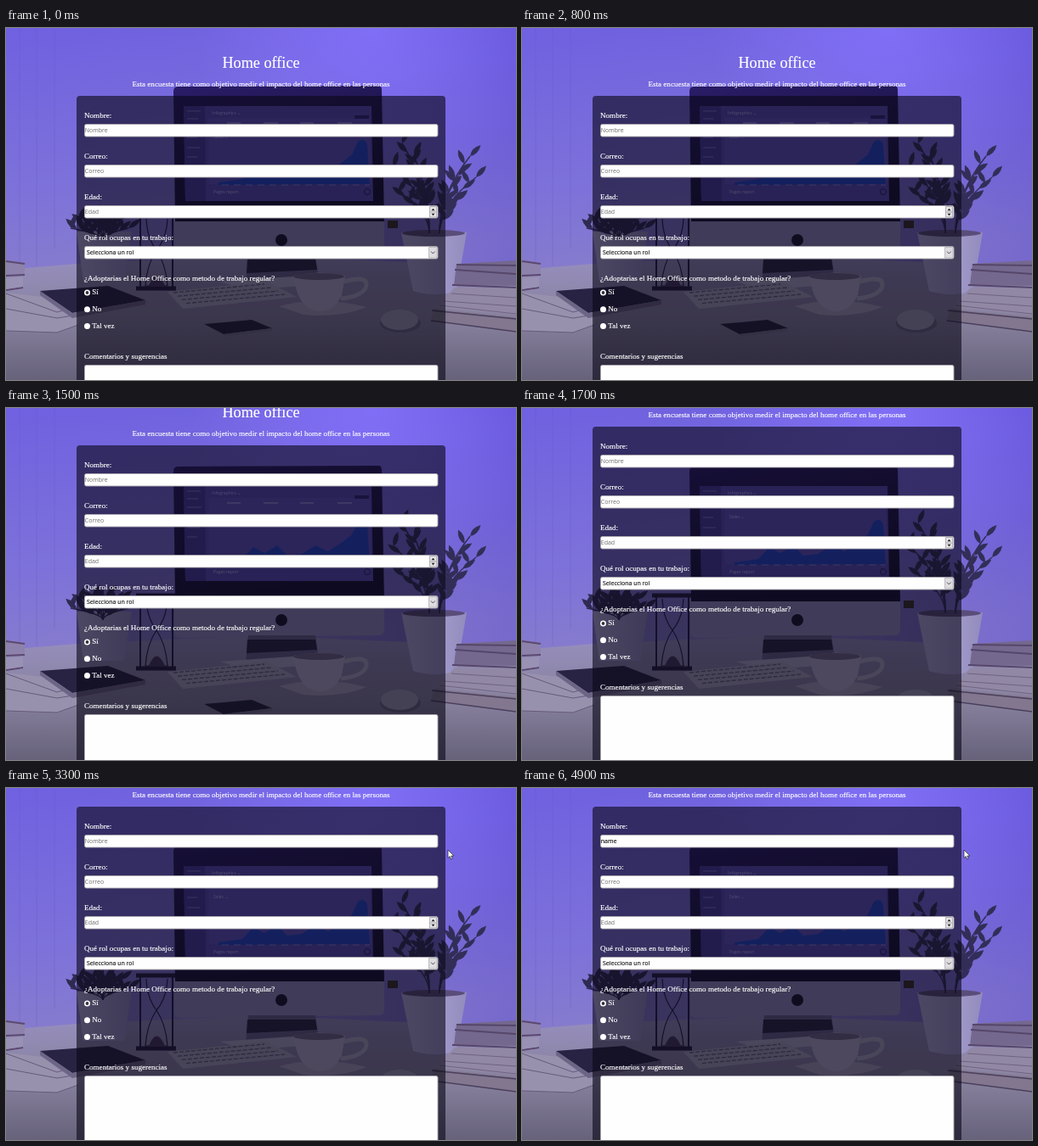
An HTML page for the animation above (5000 ms loop, 600 by 415 pixels).

```html
<!DOCTYPE html>
<html lang="es">
<head>
<meta charset="utf-8">
<title>Home office</title>
<style>
html, body { margin: 0; width: 100%; height: 100%; overflow: hidden; background: #7467d8; }
svg { display: block; width: 600px; height: 415px; }
#page text { font: 9.07px "Liberation Serif", serif; fill: #fff; stroke: #fff; stroke-width: .15; }
#page .title { font-size: 18.2px; }
#page .mid { text-anchor: middle; }
#page .val { font: 7px "Open Sans", sans-serif; fill: #111; stroke: #111; }
#page .hint { fill: #6c6c6c; stroke: none; }
</style>
</head>
<body>
<svg viewBox="0 0 600 415">
  <defs>
    <linearGradient id="wall" x2=".15" y2="1">
      <stop offset="0" stop-color="#6f61e0"/><stop offset=".45" stop-color="#7d71da"/>
      <stop offset=".72" stop-color="#877dcb"/>
    </linearGradient>
    <radialGradient id="glow" gradientUnits="userSpaceOnUse" cx="430" cy="0" r="210">
      <stop offset="0" stop-color="#8674ff" stop-opacity=".75"/><stop offset="1" stop-color="#8674ff" stop-opacity="0"/>
    </radialGradient>
    <linearGradient id="shade">
      <stop offset=".55" stop-color="#3a20d0" stop-opacity="0"/>
      <stop offset="1" stop-color="#3a20d0" stop-opacity=".22"/>
    </linearGradient>
    <linearGradient id="desk" x2="0" y2="1">
      <stop offset="0" stop-color="#978fbf"/><stop offset=".5" stop-color="#88829f"/>
      <stop offset="1" stop-color="#67627a"/>
    </linearGradient>
    <linearGradient id="pot"><stop offset="0" stop-color="#b6b0dc"/><stop offset="1" stop-color="#928bbd"/></linearGradient>
    <linearGradient id="bezel" x2=".3" y2="1"><stop offset="0" stop-color="#2a1c68"/><stop offset="1" stop-color="#141030"/></linearGradient>
  </defs>

  <g id="room">
    <rect width="600" height="415" fill="url(#wall)"/>
    <rect width="600" height="280" fill="url(#shade)"/>
    <rect width="600" height="210" fill="url(#glow)"/>
    <path d="M16 0V280M36 0V280M57 0V260" stroke="#6658c4" opacity=".35"/>
    <path d="M0 285L83 278 300 268 600 282V415H0z" fill="url(#desk)"/>
    <!-- books and notebook on the left -->
    <path d="M0 274L22 277V291L0 293z" fill="#8d82ab"/>
    <path d="M0 275L22 278M0 292L22 291M0 309L20 306" stroke="#5b4870" stroke-width="2"/>
    <path d="M0 295L20 293V305L0 308z" fill="#9a92b4"/>
    <path d="M0 312L85 322V350L60 359 0 357z" fill="#9891ae"/>
    <path d="M0 313L60 335 85 328M0 331L60 342 85 338M0 357L60 359 85 350" fill="none" stroke="#665a7b"/>
    <path d="M40 310L120 304 164 321 78 336z" fill="#282343"/>
    <path d="M40 310L78 336 164 321V326L78 342 40 315z" fill="#6c6585"/>
    <!-- left pot and hourglass -->
    <path d="M83 240H148L139 298H91z" fill="url(#pot)"/>
    <g id="bush"></g>
    <g fill="none" stroke="#241c40" stroke-width="3">
      <path d="M153 221H200M153 307H200" stroke-width="5"/>
      <path d="M158 221V307M196 221V307" stroke-width="2"/>
      <path d="M165 225Q166 248 177 262Q166 278 164 304H190Q188 278 177 262Q189 248 190 225" stroke-width="1.2"/>
    </g>
    <path d="M168 304Q177 281 187 304z" fill="#47365d"/>
    <!-- computer -->
    <path d="M198 225H445V262Q445 268 438 268L205 271Q198 271 198 264z" fill="#968ec0"/>
    <path d="M285 268H364L368 297 282 301z" fill="#69638b"/>
    <path d="M284 273H364L366 285 283 289z" fill="#292341"/>
    <path d="M252 299L366 291 396 300 284 309z" fill="#b1abc9"/>
    <path d="M202 69L438 68Q442 68 442 73L445 228H199L197 75Q197 69 202 69z" fill="url(#bezel)"/>
    <path d="M209 92H430L432 204H211z" fill="#584eba"/>
    <path d="M209 92H234L235 204H211z" fill="#473da0"/>
    <path d="M238 106H428L430 184H239z" fill="#6156c4"/>
    <path d="M250 185V182L278 178 291 164 304 171 319 162 331 174 348 172 364 162 379 169 396 158 407 149 414 134Q421 129 425 137L428 184z" fill="#2548ce"/>
    <g stroke="#aaa1ec" stroke-width="1" opacity=".65">
      <path d="M213 98H229M213 107H226M213 117H230M213 129H225M213 141H228M213 152H225"/>
      <path d="M260 112H276M303 112H320M346 112H362M390 112H407" stroke-width="2"/>
      <path d="M254 185H428" stroke-dasharray="8 6"/>
    </g>
    <g font-family="Open Sans, sans-serif" font-size="5" fill="#c4beff">
      <text x="242" y="102">Infographics ⌄</text><text x="244" y="130">Sales ⌄</text><text x="244" y="195">Pages report</text>
    </g>
    <path d="M410 103H427V107H410z" fill="#302679"/>
    <circle cx="425" cy="193" r="3.5" fill="none" stroke="#29205e"/>
    <circle cx="324" cy="250" r="7" fill="#19152c"/>
    <!-- keyboard, cup, phone, mouse -->
    <path d="M190 311L307 299 342 317 208 331z" fill="#aaa5bf"/>
    <g id="keys" stroke="#625d7b" stroke-width="1.3" stroke-dasharray="5 2"></g>
    <path d="M321 328Q370 315 424 329Q394 342 350 338z" fill="#aaa4bd"/>
    <path d="M338 292Q369 285 399 292L395 315Q386 335 367 334Q343 331 338 292z" fill="#b8b1cd"/>
    <ellipse cx="368" cy="293" rx="30" ry="4" fill="#716986"/>
    <path d="M397 299Q426 291 424 304Q421 316 394 319" fill="none" stroke="#b0aac4" stroke-width="5"/>
    <path d="M233 349L289 344 313 354 256 361z" fill="#25213c"/>
    <path d="M256 361L313 354V357L256 364z" fill="#77718c"/>
    <ellipse cx="464" cy="348" rx="24" ry="11" fill="#6b6680"/>
    <ellipse cx="463" cy="344" rx="22" ry="12" fill="#a49eb8"/>
    <!-- right plant and books -->
    <path d="M449 227H461V236H449z" fill="#3a3028"/>
    <path d="M465 241H542L530 310Q505 318 479 310z" fill="url(#pot)"/>
    <ellipse cx="503" cy="242" rx="37" ry="4" fill="#5a4d7a"/>
    <g id="leaves"></g>
    <path d="M530 278L600 274V304L527 303z" fill="#74688f"/>
    <path d="M528 285L600 290M530 279L600 280M525 303L600 306" stroke="#55466a" stroke-width="2"/>
    <path d="M528 306L600 307V338L506 329z" fill="#9188a6"/>
    <path d="M510 327L600 337M515 322L600 328M524 313L600 318" stroke="#6f647f"/>
    <path d="M504 331L600 341V358L500 344z" fill="#82778f"/>
    <path d="M501 333L600 343M500 345L600 358" stroke="#4a3f5c" stroke-width="1.6"/>
  </g>

  <g id="page">
    <text class="title mid" x="300" y="47">Home office</text>
    <text class="mid" x="300" y="69">Esta encuesta tiene como objetivo medir el impacto del home office en las personas</text>
    <rect x="83" y="80" width="434" height="420" rx="4" fill="#0a0818" fill-opacity=".61"/>
    <g id="form"></g>
    <path id="caret" d="M93.5 115.5V126" stroke="#111" stroke-width=".8"/>
  </g>
  <path id="arrow" d="M0 0V9.5L2.2 7.5 3.7 11 5.3 10.3 3.8 7H6.8z" fill="#fff" stroke="#222" stroke-width=".7"/>
  <path id="beam" d="M-2 -4.5H-.5L0 -4 .5 -4.5H2M0 -4V4M-2 4.5H-.5L0 4 .5 4.5H2" fill="none" stroke="#111" stroke-width="1"/>
</svg>
<script>
const $ = id => document.getElementById(id);
const text = (x, y, s, cls = "", id = "") => `<text x="${x}" y="${y}" class="${cls}" id="${id}">${s}</text>`;
const box = (y, h) => `<rect x="92.5" y="${y + .5}" width="415.5" height="${h}" rx="2" fill="#fffefe" stroke="#aaa5ad" stroke-width=".9"/>`;

// Form
const fields = [["Nombre:", "Nombre"], ["Correo:", "Correo"], ["Edad:", "Edad"], ["Qué rol ocupas en tu trabajo:", "Selecciona un rol"]];
let form = fields.map(([label, hint], i) => {
  const y = 113 + 48 * i, select = i == 3;
  return text(92, y - 6.7, label) + box(y, 14.5) +
    text(select ? 95 : 92.8, y + 10.2, hint, select ? "val" : "val hint", "value" + i);
}).join("");
form += `<path d="M498.5 210.5H506.5V223H498.5zM498.5 217H506.5" fill="#e4e2e5" stroke="#99959d" stroke-width=".7"/>
  <path d="M500.5 215.3L502.5 212.8 504.5 215.3zM500.5 218.8L502.5 221.3 504.5 218.8z" fill="#222"/>
  <path d="M497.5 258.5H507V271H497.5z" fill="#dedce0" stroke="#aaa6ad" stroke-width=".7"/>
  <path d="M500 263.5L502.3 266 504.6 263.5" fill="none" stroke="#555"/>`;
form += text(92, 298, "¿Adoptarias el Home Office como metodo de trabajo regular?");
["Sí", "No", "Tal vez"].forEach((s, i) => {
  const y = 312 + 19.7 * i;
  form += `<circle cx="95.5" cy="${y}" r="3.5" fill="#fff"/>` + text(101.3, y + 2.3, s);
});
form += `<circle cx="95.5" cy="312" r="1.9" fill="#35303c"/>` + text(92, 390, "Comentarios y sugerencias") + box(397, 90);
$("form").innerHTML = form;

// Keyboard rows and foliage
$("keys").innerHTML = [0, 1, 2, 3].map(i =>
  `<path d="M${197 + 5 * i} ${312 + 4.2 * i}L${304 + 8 * i} ${302 + 4 * i}"/>`).join("");

function plant(x, y, tips, color) {
  return tips.map(([tx, ty], k) => {
    let s = `<path d="M${x} ${y}Q${x} ${(y + ty) / 2} ${tx} ${ty}" fill="none" stroke="${color}" stroke-width="1.5"/>`;
    for (let i = 4; i < 11; i++) {
      const u = i / 10, lx = x + (tx - x) * u * u, ly = y + (ty - y) * u;
      const turn = (i % 2 ? -38 : 38) + (tx - x) * .3 + 9 * Math.sin(k + i);
      s += `<path transform="translate(${lx} ${ly}) rotate(${turn})" d="M0 0Q-6 -8 0 -18Q6 -8 0 0" fill="${color}"/>`;
    }
    return s;
  }).join("");
}
$("leaves").innerHTML =
  plant(498, 242, [[466, 136], [456, 163], [480, 150], [462, 193], [492, 185]], "#322e58") +
  plant(510, 242, [[546, 151], [553, 176], [532, 174], [530, 203]], "#322e58");
$("bush").innerHTML =
  plant(114, 250, [[76, 236], [86, 228], [102, 224], [118, 222], [134, 226], [144, 236]], "#2f2a52");

// Timeline
const scrollSteps = [0, 14, 36, 51, 58];
const keyTimes = [3900, 4100, 4300, 4400];
const path = [[2000, 330, 130], [2300, 230, 59], [2600, 230, 59], [3100, 520, 73], [5000, 520, 73]];

function pointer(t) {
  const i = path.findIndex(p => p[0] > t);
  const [t0, x0, y0] = path[i - 1], [t1, x1, y1] = path[i];
  let u = (t - t0) / (t1 - t0);
  u = u * u * (3 - 2 * u);
  return [x0 + (x1 - x0) * u, y0 + (y1 - y0) * u];
}

function draw(now) {
  const t = now % 5000;
  const step = Math.max(0, Math.min(4, Math.floor((t - 1300) / 100)));
  $("page").setAttribute("transform", `translate(0 ${-scrollSteps[step]})`);

  const typed = keyTimes.filter(k => t >= k).length;
  const name = $("value0");
  name.textContent = typed ? "name".slice(0, typed) : "Nombre";
  name.setAttribute("class", typed ? "val" : "val hint");
  const since = t - (typed ? keyTimes[typed - 1] : 2350);
  $("caret").style.display = since >= 0 && since % 1000 < 500 ? "" : "none";
  $("caret").setAttribute("transform", `translate(${typed ? name.getComputedTextLength() : 0} 0)`);

  const shown = t >= path[0][0];
  const [x, y] = shown ? pointer(t) : [0, 0];
  const onField = x > 92 && x < 508 && y > 54 && y < 72;
  for (const [id, on] of [["beam", onField], ["arrow", !onField]]) {
    $(id).style.display = shown && on ? "" : "none";
    $(id).setAttribute("transform", `translate(${x} ${y})`);
  }
}

let start;
function frame(now) {
  start ??= now;
  draw(now - start);
  requestAnimationFrame(frame);
}
draw(0);
requestAnimationFrame(frame);
</script>
</body>
</html>
```
